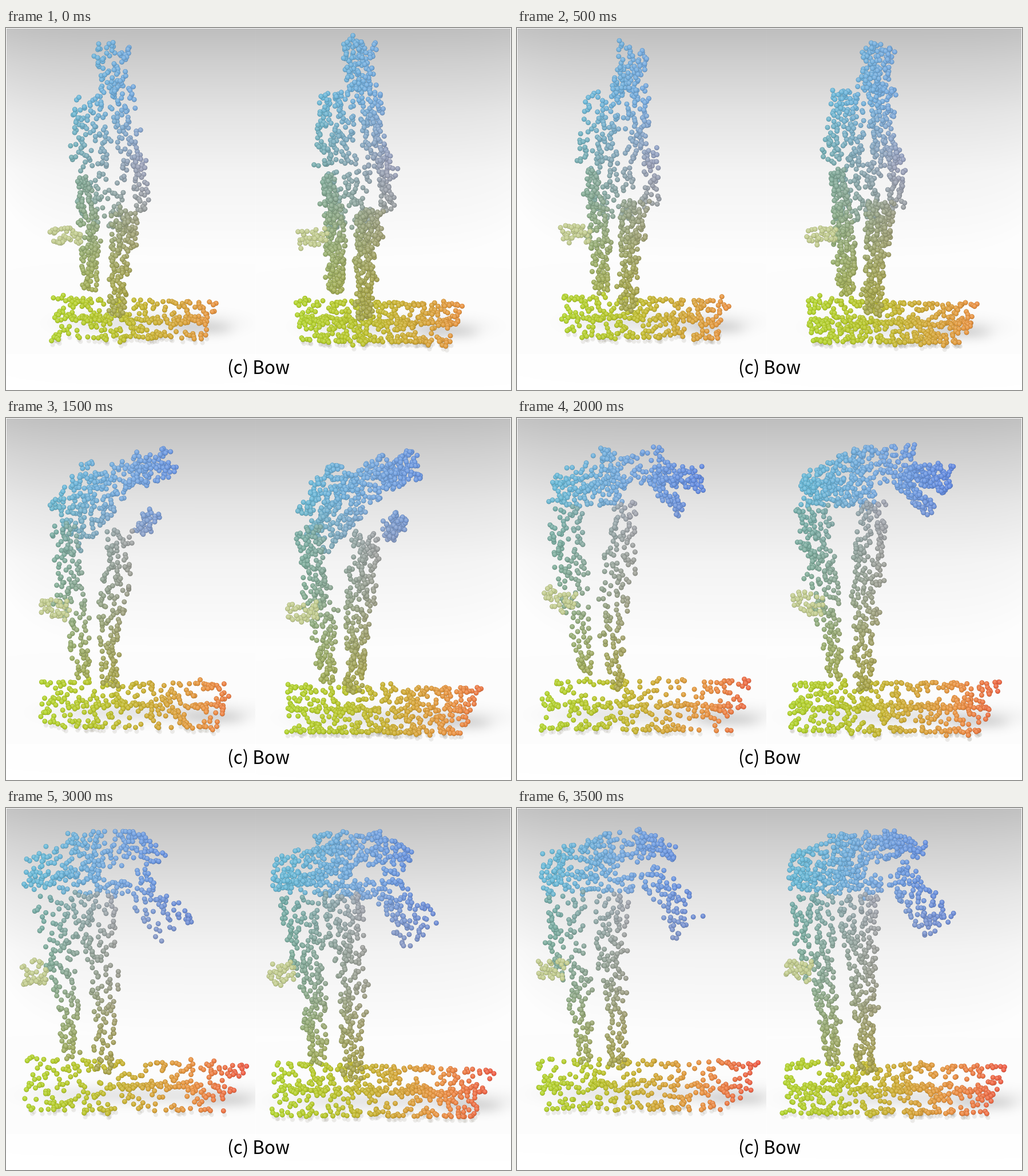
These frames come from a looping animation (883x634 px, 4000 ms). A matplotlib script:

```python
import numpy as np
import matplotlib.pyplot as plt
from matplotlib.animation import FuncAnimation

W, H, DPI = 883, 634, 64
PT = 72 / DPI
RADIUS = 4.4
GOLDEN = (5 ** 0.5 - 1) / 2

# Points per body part in the sparse cloud; the dense one has more
COUNTS = dict(back=95, chest=78, arm=42, waist=72, thigh_l=84, shin_l=62,
              thigh_r=78, shin_r=80, head=78, bag=34)
UPPER = {"back", "chest", "arm", "waist", "head"}
FLOOR_COUNT = 310
DENSE = 1.5

# Colour rows: height, then left, middle and right colour
U_NODES = [0.08, 0.4, 0.75]
UPPER_ROWS = [
    (130, (108, 186, 216), (122, 170, 224), (100, 138, 226)),
    (240, (122, 174, 176), (156, 162, 186), (120, 145, 206)),
    (335, (134, 176, 152), (158, 163, 156), (146, 150, 174)),
]
LOWER_ROWS = [
    (150, (118, 174, 172), (162, 166, 178), (162, 166, 178)),
    (300, (134, 174, 150), (158, 160, 146), (158, 160, 146)),
    (460, (164, 182, 92), (172, 163, 74), (172, 163, 74)),
]
FLOOR_U = [0, 0.25, 0.5, 0.75, 1]
FLOOR_COLORS = [(180, 213, 48), (186, 200, 46), (208, 174, 56),
                (235, 148, 68), (240, 94, 72)]
BAG_COLOR = (196, 206, 146)


def pose(**parts):
    return {k: np.array(v, float) for k, v in parts.items()}


def mix(a, b, t):
    return {k: a[k] * (1 - t) + b[k] * t for k in a}


# Parts: x0, y0, x1, y1, half width at each end.
# Floor: back left, back right, front right, front left.
# Dense: shift of the second cloud (x, y at the top, y at the bottom).
upright = pose(
    back=(146, 245, 148, 118, 38, 28), chest=(220, 245, 200, 105, 18, 24),
    arm=(238, 320, 233, 225, 14, 12), waist=(165, 350, 170, 252, 40, 42),
    thigh_l=(133, 260, 148, 385, 10, 20), shin_l=(146, 380, 147, 460, 16, 12),
    thigh_r=(206, 320, 203, 385, 24, 22), shin_r=(198, 385, 194, 505, 17, 14),
    head=(182, 115, 190, 30, 21, 31), bag=(80, 365, 132, 365, 15, 15),
    floor=(82, 472, 372, 480, 347, 545, 82, 543), dense=(430, -9, 6))
lean = pose(
    back=(118, 215, 158, 95, 25, 32), chest=(182, 170, 225, 85, 30, 25),
    arm=(234, 297, 230, 165, 16, 14), waist=(155, 290, 168, 150, 38, 34),
    thigh_l=(118, 215, 135, 360, 11, 24), shin_l=(142, 350, 145, 462, 24, 13),
    thigh_r=(213, 245, 200, 350, 24, 24), shin_r=(196, 350, 190, 465, 20, 15),
    head=(205, 108, 252, 42, 28, 25), bag=(76, 347, 122, 349, 16, 16),
    floor=(78, 463, 388, 470, 362, 540, 76, 537), dense=(427, 10, 15))
bowed = pose(
    back=(68, 125, 172, 80, 26, 32), chest=(150, 90, 262, 76, 38, 28),
    arm=(236, 108, 290, 165, 13, 12), waist=(60, 132, 190, 135, 22, 20),
    thigh_l=(82, 155, 96, 290, 28, 30), shin_l=(102, 290, 120, 450, 28, 10),
    thigh_r=(186, 145, 178, 290, 22, 30), shin_r=(172, 290, 170, 475, 26, 13),
    head=(245, 98, 325, 108, 16, 27), bag=(46, 312, 100, 328, 15, 18),
    floor=(45, 461, 415, 460, 375, 548, 42, 545), dense=(435, 0, 3))
low = pose(
    back=(50, 115, 170, 80, 30, 36), chest=(130, 88, 235, 60, 38, 18),
    arm=(185, 46, 280, 84, 9, 12), waist=(48, 130, 222, 128, 18, 18),
    thigh_l=(80, 150, 90, 300, 40, 26), shin_l=(108, 300, 116, 442, 22, 12),
    thigh_r=(165, 150, 168, 275, 37, 28), shin_r=(172, 275, 170, 475, 26, 16),
    head=(230, 118, 312, 198, 20, 34), bag=(36, 298, 82, 298, 20, 20),
    floor=(38, 450, 427, 460, 390, 540, 35, 538), dense=(433, 1, 4))
lowest = pose(
    back=(40, 110, 168, 76, 32, 38), chest=(110, 80, 225, 68, 40, 28),
    arm=(210, 54, 272, 94, 20, 18), waist=(32, 125, 205, 138, 18, 18),
    thigh_l=(85, 150, 100, 300, 44, 24), shin_l=(104, 300, 115, 440, 22, 15),
    thigh_r=(154, 150, 168, 270, 38, 27), shin_r=(172, 275, 172, 465, 25, 17),
    head=(220, 116, 298, 220, 27, 40), bag=(28, 287, 72, 285, 22, 21),
    floor=(36, 438, 423, 450, 385, 531, 30, 529), dense=(433, 1, 10))
rising = pose(
    back=(48, 110, 168, 76, 30, 36), chest=(120, 85, 235, 62, 38, 24),
    arm=(205, 48, 278, 78, 14, 14), waist=(42, 128, 205, 132, 18, 18),
    thigh_l=(80, 150, 95, 300, 40, 26), shin_l=(104, 300, 120, 445, 22, 10),
    thigh_r=(162, 150, 168, 280, 34, 26), shin_r=(172, 280, 175, 455, 22, 15),
    head=(230, 108, 308, 208, 24, 36), bag=(36, 280, 82, 285, 16, 18),
    floor=(36, 438, 423, 446, 390, 529, 35, 528), dense=(433, 0, 7))

POSES = [upright, mix(upright, lean, 0.25), lean, mix(lean, bowed, 0.5),
         bowed, low, lowest, rising]


def spread(rng, n):
    """Evenly scattered, slightly irregular points in the unit square."""
    i = np.arange(n)
    u = (i + rng.uniform(0, 1, n)) / n
    v = (i * GOLDEN + rng.uniform(0, 0.45, n)) % 1
    return u[:, None], v[:, None]


def clump(rng, pts, n):
    """Fill the cloud up to n with close neighbours of existing points."""
    extra = n - len(pts)
    angle = rng.uniform(0, 2 * np.pi, extra)
    dist = rng.uniform(4, 9, extra)
    near = pts[rng.integers(0, len(pts), extra)]
    step = np.column_stack([np.cos(angle), np.sin(angle)]) * dist[:, None]
    return np.vstack([pts, near + step])


def limb_points(rng, part, n):
    start, end, (w0, w1) = part[:2], part[2:4], part[4:]
    t, side = spread(rng, int(n * 0.8))
    axis = end - start
    normal = np.array([-axis[1], axis[0]]) / np.hypot(*axis)
    reach = (2 * side - 1) * (w0 + (w1 - w0) * t)
    pts = clump(rng, start + t * axis + reach * normal, n)
    return rng.permutation(pts)


def floor_points(rng, corners, n):
    a, b, c, d = corners.reshape(4, 2)
    u, v = spread(rng, int(n * 0.8))
    v = v + 0.06 * np.sin(4 * np.pi * v + np.pi)  # thinner in the middle
    pts = (1 - v) * (a + u * (b - a)) + v * (d + u * (c - d))
    pts = clump(rng, pts, n)
    return pts[np.argsort(pts[:, 1])]


def grid_color(rows, u, y):
    heights = [r[0] for r in rows]
    out = np.empty((len(u), 3))
    for ch in range(3):
        cols = [np.interp(y, heights, [r[k][ch] for r in rows]) for k in (1, 2, 3)]
        low_u = np.interp(u, U_NODES[:2], [0, 1])
        high_u = np.interp(u, U_NODES[1:], [0, 1])
        out[:, ch] = (cols[0] + (cols[1] - cols[0]) * low_u
                      + (cols[2] - cols[1]) * high_u)
    return out


def make_cloud(rng, p, factor):
    left = p["floor"][0]
    floor = floor_points(rng, p["floor"], int(FLOOR_COUNT * factor))
    u = (floor[:, 0] - left) / 385
    color = np.column_stack([np.interp(u, FLOOR_U, [c[k] for c in FLOOR_COLORS])
                             for k in range(3)])
    clouds, colors = [floor], [color]
    for name, count in COUNTS.items():
        n = count if name == "bag" else int(count * factor)
        pts = limb_points(rng, p[name], n)
        u = (pts[:, 0] - left) / 385
        if name == "bag":
            color = np.tile(BAG_COLOR, (n, 1))
        else:
            rows = UPPER_ROWS if name in UPPER else LOWER_ROWS
            color = grid_color(rows, u, pts[:, 1])
        clouds.append(pts)
        colors.append(color)
    return np.vstack(clouds), np.vstack(colors) / 255, len(floor)


def shift_dense(pts, p):
    dx, top, bottom = p["dense"]
    x, y = pts.T
    return np.column_stack([x + dx, y + np.interp(y, [30, 540], [top, bottom])])


X, Y = np.meshgrid(np.arange(W) + 0.5, np.arange(H) + 0.5)


def make_backdrop():
    grey = np.interp(Y, [0, 60, 150, 250, 400, 570, 573],
                     [190, 207, 228, 243, 253, 253, 255])
    grey = grey + 6 * np.exp(-X / 60) + 3 * np.exp(-(W - X) / 60)
    grey = np.where(np.abs(X - 436.5) < 1, grey + 2, grey)
    edge = (X < 1) | (Y < 1) | (X > W - 1)
    return np.where(edge, 255, np.minimum(grey, np.where(Y < 571, 253, 255)))


BACKDROP = make_backdrop()


def soft_blob(cx, cy, sx, sy):
    return np.exp(-((X - cx) / sx) ** 4 - ((Y - cy) / sy) ** 2)


def backdrop_for(p):
    img = BACKDROP.copy()
    corners = p["floor"].reshape(4, 2)
    for k, quad in enumerate((corners, shift_dense(corners, p))):
        panel = (X < 436.5) if k == 0 else (X > 436.5)
        (x0, _), (x1, _), (xr, yr), _ = quad
        shade = 22 * soft_blob((x0 + x1) / 2 + 25, yr - 28, (x1 - x0) / 2, 18)
        shade += 22 * soft_blob(xr - 5, yr - 18, 52, 14)
        img -= shade * panel
    return np.repeat(img[:, :, None], 3, axis=2) / 255


def size(radius):
    return (2 * radius * PT) ** 2


def spheres(pts, color):
    """Each ball is a dark rim, a body and a highlight, drawn in sequence."""
    layers = [(0, 0, RADIUS, color * 0.82),
              (-0.2, -0.5, RADIUS * 0.86, color),
              (-0.5, -1.3, RADIUS * 0.5, color * 0.82 + 0.18)]
    pos = np.stack([pts + (dx, dy) for dx, dy, _, _ in layers], 1).reshape(-1, 2)
    rgb = np.stack([c for *_, c in layers], 1).reshape(-1, 3)
    rgba = np.column_stack([rgb, np.ones(len(rgb))])
    return pos, np.tile([size(r) for _, _, r, _ in layers], len(pts)), rgba


def contact_shadows(floor, front):
    pts = floor[floor[:, 1] > front - 16] + (2, 7)
    n = len(pts)
    return pts, np.full(n, size(4)), np.tile([0.45, 0.43, 0.36, 0.12], (n, 1))


fig = plt.figure(figsize=(W / DPI, H / DPI), dpi=DPI, facecolor="white")
ax = fig.add_axes([0, 0, 1, 1])
ax.set_xlim(0, W)
ax.set_ylim(H, 0)
ax.axis("off")
wall = ax.imshow(np.ones((H, W, 3)), extent=(0, W, H, 0), aspect="auto",
                 interpolation="nearest")
balls = ax.scatter([], [], linewidths=0)
ax.text(441.5, 606, "(c) Bow", ha="center", va="baseline", color="black",
        family="Noto Sans CJK JP", fontsize=31.4 * PT)


def draw(i):
    p = POSES[i]
    rng = np.random.default_rng(40 + i)
    wall.set_data(backdrop_for(p))
    groups = []
    for dense in (False, True):
        pts, color, n_floor = make_cloud(rng, p, DENSE if dense else 1)
        if dense:
            pts = shift_dense(pts, p)
        floor = pts[:n_floor]
        groups.append(contact_shadows(floor, floor[:, 1].max()))
        groups.append(spheres(pts, color))
    pos, sizes, rgba = (np.concatenate(g) for g in zip(*groups))
    balls.set_offsets(pos)
    balls.set_sizes(sizes)
    balls.set_facecolors(np.clip(rgba, 0, 1))
    return wall, balls


anim = FuncAnimation(fig, draw, frames=len(POSES), interval=500, repeat=True,
                     repeat_delay=0)
plt.show()
```
